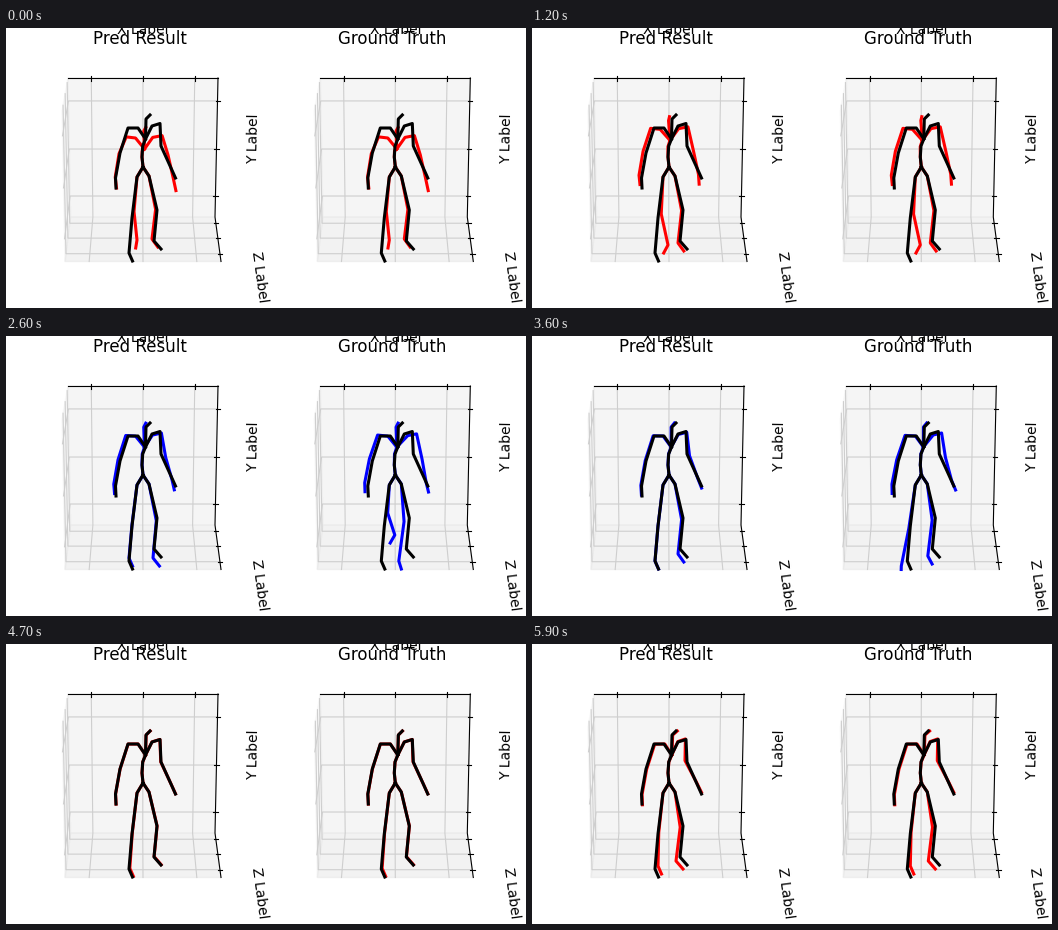
A matplotlib script for the animation above (6000 ms loop, 520 by 280 pixels).

```python
import numpy as np
import matplotlib.pyplot as plt
from matplotlib.animation import FuncAnimation

W, H, DPI = 520, 280, 100
FRAMES, STEP_MS = 60, 100
BLUE_START, ARRIVE = 15, 45  # the figure meets the black pose at ARRIVE
PITCH = 252.3                # distance between the two plots
FLOOR = 233.5

plt.rcParams["font.family"] = "DejaVu Sans"
fig = plt.figure(figsize=(W / DPI, H / DPI), dpi=DPI, facecolor="white")
ax = fig.add_axes([0, 0, 1, 1])
ax.set_xlim(0, W)
ax.set_ylim(H, 0)
ax.axis("off")


def points(*xy):
    return np.array(xy, float)


def mix(a, b, t):
    return a + (b - a) * t


def stroke(xy, dx, **style):
    xy = np.array(xy)
    return ax.plot(xy[:, 0] + dx, xy[:, 1], **style)[0]


# ---- perspective box -------------------------------------------------

FAR_LT, FAR_RT, FAR_RB, FAR_LB = points((62, 50), (212, 50), (209, 189), (64.5, 189))
NEAR_LT, NEAR_LB, NEAR_RB = points((56, 83), (59, FLOOR), (215, FLOOR))
X_TICKS = (0.155, 0.5, 0.845)
Y_TICKS = (0.165, 0.511, 0.849)
Z_TICKS = (0.14, 0.475, 0.825)


def draw_box(dx):
    panes = (
        ((FAR_LT, FAR_LB, NEAR_LB, NEAR_LT), 0.95),
        ((FAR_LB, FAR_RB, NEAR_RB, NEAR_LB), 0.90),
        ((FAR_LT, FAR_RT, FAR_RB, FAR_LB), 0.925),
    )
    for outline, grey in panes:
        tone = (grey, grey, grey, 0.5)
        ax.add_patch(plt.Polygon(np.array(outline) + (dx, 0), fc=tone, ec=tone, lw=1))

    grid = dict(color="#cecece", lw=0.8, zorder=1.5, snap=False)
    edge = dict(color="black", lw=0.8, zorder=1.8)
    for t in X_TICKS:
        top = mix(FAR_LT, FAR_RT, t)
        stroke([top, mix(FAR_LB, FAR_RB, t), mix(NEAR_LB, NEAR_RB, t)], dx, **grid)
        stroke([top - (0, 2.5), top + (0, 2.5)], dx, **edge)
    sides = ((Y_TICKS, NEAR_LT, NEAR_LB, FAR_LT, FAR_LB, FAR_RT, FAR_RB),
             (Z_TICKS, FAR_LT, NEAR_LT, FAR_LB, NEAR_LB, FAR_RB, NEAR_RB))
    for ticks, a0, a1, b0, b1, c0, c1 in sides:
        for t in ticks:
            right = mix(c0, c1, t)
            stroke([mix(a0, a1, t), mix(b0, b1, t), right], dx, **grid)
            stroke([right - (2, 0), right + (2.5, 0)], dx, **edge)
    stroke([FAR_LT, FAR_RT], dx, **edge)
    stroke([FAR_RT, FAR_RB, NEAR_RB], dx, **edge)


def slope(a, b):
    return np.degrees(np.arctan2(a[1] - b[1], b[0] - a[0]))


def draw_labels(title, dx):
    def label(x, y, text, size=10, angle=0):
        ax.text(x + dx, y, text, size=size, rotation=angle, ha="center",
                va="baseline", rotation_mode="anchor")

    label(134, 16, title, size=12)
    label(137, 6, "X Label")
    label(252, 111, "Y Label", angle=slope(FAR_RB, FAR_RT))
    label(249.3, 250, "Z Label", angle=slope(FAR_RB, NEAR_RB))


# ---- resting figure --------------------------------------------------

TRUNK = points((137, 139), (136, 129), (136.7, 118), (139.5, 111), (140, 91), (144, 87))
ARM_L = points((132, 100), (122, 100), (114, 125), (109.5, 150), (110, 160))
ARM_R = points((146, 98), (154, 95.5), (155, 118), (165, 140), (169.5, 150))
LEG_L = points((131, 149), (126, 190), (123, 225), (126.5, 233))
LEG_R = points((143, 148), (151, 182), (148, 213), (155, 221))

# share of each sway that reaches every joint, from the body outwards
TRUNK_STOOP = np.array([0, 0, 0.5, 1, 1.2, 1.25])
TRUNK_LEAN = np.array([0, 0, 0.2, 0.4, 0.9, 1.7])
ALONG_ARM = np.linspace(0, 1, 5)


def move(joints, dx, dy):
    return joints + np.column_stack([dx, dy])


def bend_leg(rest, ankle, knee_gain, tilt):
    dx, dy = ankle
    hip, knee, heel, toe = rest
    knee = knee + ankle * knee_gain
    toe = toe + (dx - tilt * abs(dx), dy)
    toe[1] = min(toe[1], FLOOR)
    return np.array([hip, knee, heel + ankle, toe])


def figure(n, ankles, spread=0.0):
    """Five joint chains; spread opens the arms."""
    u = n / ARRIVE
    stoop = 10 * np.exp(-n / 6)
    lean = -(1 - u) * (2.5 + 14 * max(u * (1 - u), 0))
    reach = max(7 * (1 - u * u), (ARRIVE - n) / 7) + 3 * spread

    trunk = move(TRUNK, lean * TRUNK_LEAN, stoop * TRUNK_STOOP)

    hang = ALONG_ARM * (lean - 2 * spread)
    left = move(
        ARM_L,
        lean * (1 - 0.4 * ALONG_ARM) + (0.2 * stoop - 2 * spread) * ALONG_ARM,
        stoop * np.array([1, 0.95, 0.2, 0.1, 0.25]) + hang,
    )
    right = move(
        ARM_R,
        reach * np.array([0.1, 0.3, 1, 0.4, 0.7])
        + lean * np.array([0, 0, 0, 0.3, 1.8]) + 3 * spread * (1 - ALONG_ARM),
        reach * np.array([0.2, 0.3, 0.7, 0.9, 0.8])
        + stoop * np.array([1, 1, 0.4, 0.3, 0.7]),
    )

    tilt = 0.6 if n < ARRIVE else 0
    leg_l = bend_leg(LEG_L, ankles[:2], (0.25, 0.5), tilt)
    leg_r = bend_leg(LEG_R, ankles[2:], (0.7, 0.3), tilt)
    chest, hip = trunk[3:4], trunk[:1]
    return [trunk] + [np.vstack(pair) for pair in
                      ((chest, left), (chest, right), (hip, leg_l), (hip, leg_r))]


def track(keys):
    """Smooth path through timed points."""
    times = np.array(list(keys), float)
    values = np.array(list(keys.values()), float)
    speeds = np.gradient(values, times, axis=0)

    def at(t):
        i = int(np.clip(np.searchsorted(times, t, side="right") - 1, 0, len(times) - 2))
        span = times[i + 1] - times[i]
        u = (t - times[i]) / span
        return (mix(values[i], values[i + 1], u * u * (3 - 2 * u))
                + u * (1 - u) * span * ((1 - u) * speeds[i] - u * speeds[i + 1]))

    return at


# ankle offsets from rest: left x, y, right x, y
STILL = (0, 0, 0, 0)
true_ankles = track({0: (8, -13, -2, -2), 12: (13, -8, -2, 2), 19: (15.5, -15, -6, 14),
                     26: (13.5, -26, -7.5, 12), 36: (-6, 5, -4.5, 7),
                     ARRIVE: STILL, 59: (3, -3, -4, 4)})
pred_ankles = track({14: true_ankles(14), 19: (9, -12, 0, 9), 26: (0, -3, -1, 9),
                     36: (0, 0, -2, 5), ARRIVE: STILL})


def draw_figure(chains, dx, color, zorder):
    return [stroke(c, dx, color=color, lw=2.2, zorder=zorder) for c in chains]


OFFSETS = (0, PITCH)
target = [TRUNK] + [np.vstack([TRUNK[root], limb]) for root, limb in
                    ((3, ARM_L), (3, ARM_R), (0, LEG_L), (0, LEG_R))]
movers = []
for title, dx in zip(("Pred Result", "Ground Truth"), OFFSETS):
    draw_box(dx)
    draw_labels(title, dx)
    movers.append(draw_figure(target, dx, "red", 3))
    draw_figure(target, dx, "black", 4)


def update(n):
    blue = BLUE_START <= n < ARRIVE
    spread = np.sin(np.pi * (n - BLUE_START) / (ARRIVE - BLUE_START)) if blue else 0
    true_pose = figure(n, true_ankles(n), spread)
    pred_pose = figure(n, pred_ankles(n)) if blue else true_pose
    for lines, chains, dx in zip(movers, (pred_pose, true_pose), OFFSETS):
        for line, joints in zip(lines, chains):
            line.set_data(joints[:, 0] + dx, joints[:, 1])
            line.set_color("blue" if blue else "red")
    return movers[0] + movers[1]


anim = FuncAnimation(fig, update, frames=FRAMES, interval=STEP_MS,
                     repeat=True, repeat_delay=0, blit=False)
plt.show()
```
